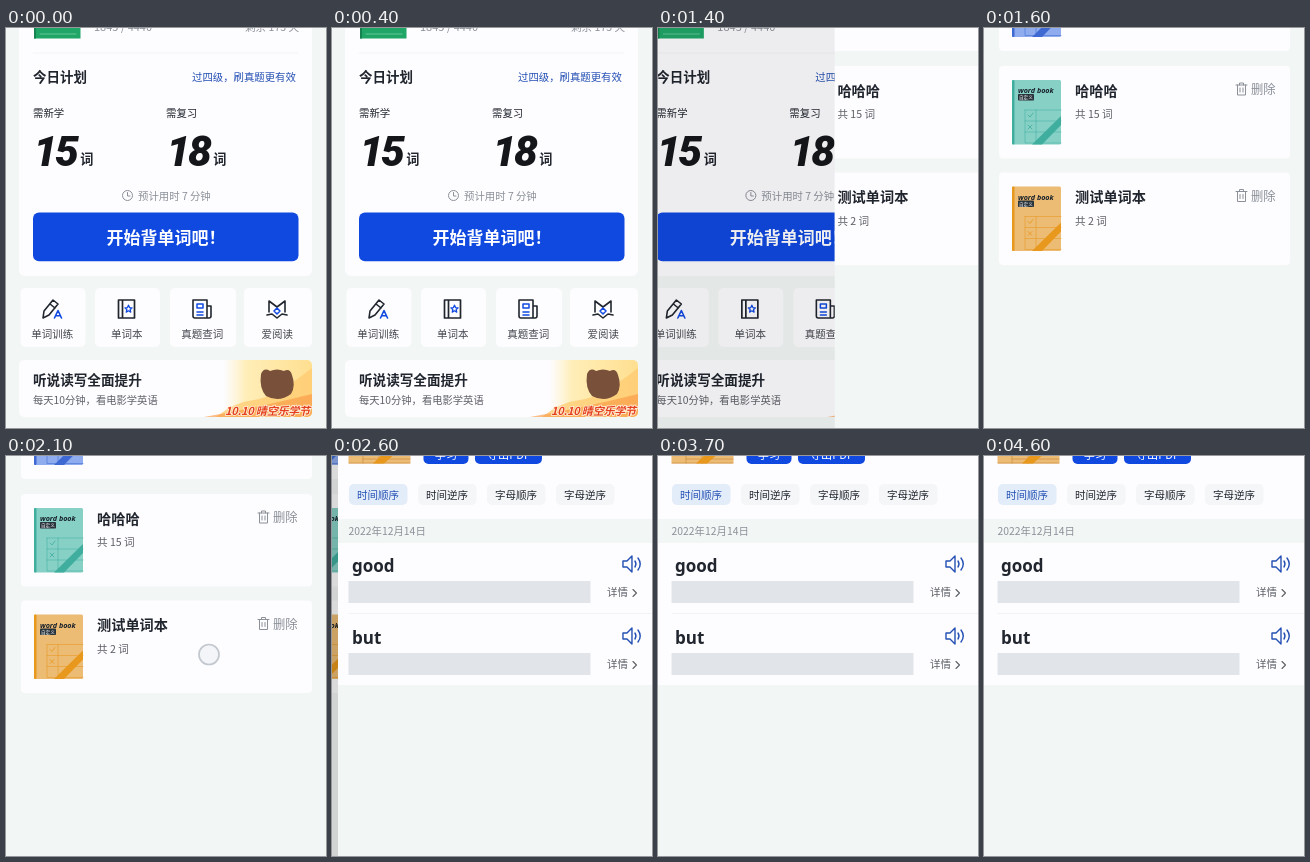
An HTML page that plays this animation: 320 px wide and 400 px high, repeating every 4700 ms.

```html
<!DOCTYPE html>
<html lang="zh-CN">
<head>
<meta charset="utf-8">
<title>单词本</title>
<style>
  html, body { margin: 0; width: 100%; height: 100%; overflow: hidden; background: #f2f6f4; }
  svg { display: block; width: 320px; height: 400px; }
  text { font-family: "Noto Sans CJK SC", "Noto Sans CJK", "Noto Sans", sans-serif; white-space: pre; }
</style>
</head>
<body>
<svg id="stage" viewBox="0 0 320 400" xmlns="http://www.w3.org/2000/svg"></svg>
<script>
const LOOP = 4700, WIDTH = 320, PARALLAX = 64, PUSH_MS = 250;
const LIST_PUSH = 1334, DETAIL_PUSH = 2395;
const BG = '#f2f6f4', PAPER = '#fdfcfe', INK = '#20252e', GREY = '#8b9099', MID = '#5c6066';
const BLUE = '#1049e0', LINK = '#2450b4';

const rect = (x, y, w, h, fill, r = 0, extra = '') =>
  `<rect x="${x}" y="${y}" width="${w}" height="${h}" rx="${r}" fill="${fill}" ${extra}/>`;
const text = (x, y, size, str, fill = INK, extra = '') =>
  `<text x="${x}" y="${y}" font-size="${size}" fill="${fill}" ${extra}>${str}</text>`;
const bold = (x, y, size, str, fill = INK, extra = '') =>
  text(x, y, size, str, fill, 'font-weight="700" ' + extra);
const line = (d, stroke, w = 1.4, extra = '') =>
  `<path d="${d}" fill="none" stroke="${stroke}" stroke-width="${w}" stroke-linecap="round" stroke-linejoin="round" ${extra}/>`;
const at = (x, y, body) => `<g transform="translate(${x} ${y})">${body}</g>`;
const page = body => rect(0, 0, WIDTH, 400, BG) + body;

const star = (r, inner) => 'M' + Array.from({ length: 10 }, (_, i) => {
  const a = i * Math.PI / 5 - Math.PI / 2, d = i % 2 ? inner : r;
  return (d * Math.cos(a)).toFixed(2) + ' ' + (d * Math.sin(a)).toFixed(2);
}).join('L') + 'Z';

// Tile icons, each centred on its own origin
const icons = {
  pencil: line('M-9 9L-8 2L1-9L6-5L-3 6ZM-2-5L3-1', INK, 1.6) +
    line('M2.5 9L6 1.5L9.5 9M3.8 6.8H8.2', BLUE, 1.6),
  notebook: line('M-8-9H8V9H-8ZM-4-9V9', INK, 1.7) + at(2, 0, line(star(3.8, 1.8), BLUE, 1.3)),
  news: line('M-9-9H5V9H-7Q-9 9-9 7ZM5-3H9V7Q9 9 7 9H4', INK, 1.6) +
    line('M-5-5H1V-1H-5ZM-5 3H1M-5 6H1', BLUE, 1.5),
  reader: line('M-8 3V-8L0-2L8-8V3M-10 6L-5 5L0 9L5 5L10 6', INK, 1.6) +
    line('M0-1L3 2L0 5L-3 2Z', BLUE, 1.5)
};

const tile = (x, w, icon, label) =>
  rect(x, 260, w, 59, PAPER, 5) + at(x + w / 2 - 1, 281, icons[icon]) +
  text(x + w / 2 - .7, 310, 10.5, label, '#43474e', 'text-anchor="middle"');

const count = (x, label, n) =>
  text(x, 89, 10.4, label) +
  text(x + .5, 137.5, 42.5, n, '#14161a', 'style="font-family:Roboto,Inter,sans-serif" font-weight="800" font-style="italic" letter-spacing="-2.4"') +
  bold(x + 47.3, 135.7, 13.2, '词');

const banner = () =>
  rect(13, 332, 293, 57, PAPER, 5) +
  `<g clip-path="url(#bannerClip)">` +
  rect(218, 332, 88, 57, 'url(#sun)') +
  `<path d="M210 389Q228 374 248 372T306 340V389Z" fill="#ffcb70" opacity=".75"/>` +
  `<path d="M198 389Q250 380 306 366V389Z" fill="#fb9a45" opacity=".65"/>` +
  `<path d="M255 346Q258 339 264 343Q271 340 278 343Q284 340 286 347Q290 358 285 366Q273 375 260 368Q253 360 255 346Z" fill="#79513a"/>` +
  `</g>` +
  bold(219, 386.5, 11, '10.10 晴空乐学节', '#e4401f',
    'font-style="italic" stroke="#fff3dc" stroke-width="1.6" paint-order="stroke" letter-spacing="-.2"') +
  bold(27, 357, 13.6, '听说读写全面提升') +
  text(27, 376, 10.3, '每天10分钟，看电影学英语', MID);

const home = () => page(
  rect(13, -20, 293, 268, PAPER, 6) +
  rect(28, -40, 46.5, 50.5, '#1fa566') + rect(28, -40, 2, 50.5, '#158350') +
  line('M34 6H70', '#63c796', 1) + line('M27 25H292', '#f4f4f7', 1) +
  text(88, 3, 11, '1845 / 4440', GREY) + text(239, 3, 10.6, '剩余 173 天', GREY) +
  bold(27, 53.5, 13.5, '今日计划') +
  text(186, 52.5, 10.4, '过四级，刷真题更有效', LINK) +
  count(27, '需新学', 15) + count(160, '需复习', 18) +
  `<circle cx="121.5" cy="167.5" r="5" fill="none" stroke="${GREY}"/>` +
  line('M121.5 164.5V168H124', GREY, 1) +
  text(132, 171.5, 10.4, '预计用时 7 分钟', GREY) +
  rect(27, 184.5, 265.5, 48.7, BLUE, 6) +
  bold(100.4, 216, 17, '开始背单词吧！', '#fff') +
  tile(14.5, 65, 'pencil', '单词训练') + tile(89, 65, 'notebook', '单词本') +
  tile(164, 66, 'news', '真题查词') + tile(238, 68, 'reader', '爱阅读') +
  banner());

const book = (x, y, cover, accent) => at(x, y,
  rect(0, 0, 49, 64.5, cover, 1.5) + rect(0, 0, 2.5, 64.5, accent, 1) +
  line('M13 30H49M13 41H49M13 52H49M13 30V63H49M24 30V63', accent, .7, 'opacity=".75"') +
  line('M16 35L18 37L21 33M16 45L20 49M20 45L16 49', accent, .8) +
  `<path d="M20 64.5L49 36V45L30 64.5Z" fill="${accent}"/>` +
  bold(6, 13, 7.2, 'word book', '#17202a', 'font-style="italic" style="font-family:\'Noto Sans\',sans-serif"') +
  rect(6, 14, 16, 6.5, '#27323a', .8) + text(7, 19.3, 4.6, '自定义', '#fff'));

const trash = line('M0 2H11M3.5 2V0H7.5V2M1.5 2V12H9.5V2M4 5V9M7 5V9', GREY, 1);

const deck = (y, name, total, cover, accent) =>
  rect(15, y, 291, 92.5, PAPER, 4) + book(28, y + 14, cover, accent) +
  bold(91, y + 29.5, 14.2, name) + text(91, y + 52, 10.6, `共 ${total} 词`, MID) +
  at(252, y + 17, trash) + text(267, y + 28, 12.3, '删除', GREY);

const list = () => page(
  deck(-69.5, '单词本', 8, '#8eacee', '#3f69d2') +
  deck(38, '哈哈哈', 15, '#86d0c6', '#3fae9e') +
  deck(144.5, '测试单词本', 2, '#ecbb74', '#e8981c') +
  `<circle id="touch" cx="203" cy="198.5" r="10" fill="#f3f5f8" stroke="#c3c8cf" stroke-width="1.7"/>`);

const chip = (x, label, active) =>
  rect(x, 28, 58.5, 21, active ? '#e3edf9' : '#f4f6f7', 5) +
  text(x + 29, 42.8, 10.5, label, active ? LINK : INK, 'text-anchor="middle"');

const speaker = line('M0 5H4L9 0V16L4 11H0ZM12 5Q14 8 12 11M15 2Q19.5 8 15 14', LINK, 1.4);

const word = (y, str) =>
  bold(17, y + 29, 17, str, INK, 'style="font-family:\'Noto Sans\',\'Open Sans\',sans-serif"') +
  at(288, y + 13, speaker) + rect(13.5, y + 38, 242, 22, '#e1e5ea') +
  text(272, y + 53.3, 10.5, '详情', MID) + line(`M298 ${y + 46.5}L301.5 ${y + 50}L298 ${y + 53.5}`, MID, 1.1);

const detail = () => page(
  rect(0, 0, WIDTH, 63, PAPER) + rect(0, 87, WIDTH, 142, PAPER) +
  rect(13.5, -40, 62, 47.5, '#ecbb74', 1) +
  line('M14 7H75M28 3H75M28-2V7M44-2V7', '#cf944b', .8) +
  `<path d="M38 7.5L50-4H62L49 7.5Z" fill="#e8981c"/>` +
  rect(88.5, -20, 45, 28, BLUE, 5) + rect(140, -20, 67, 28, BLUE, 5) +
  text(111, 2.6, 11.2, '学习', '#fff', 'text-anchor="middle" font-weight="500"') +
  text(173.5, 2.6, 11.2, '导出PDF', '#fff', 'text-anchor="middle" font-weight="500"') +
  chip(14, '时间顺序', true) + chip(83, '时间逆序') + chip(152, '字母顺序') + chip(221, '字母逆序') +
  text(13.5, 79, 10.4, '2022年12月14日', GREY) +
  word(87, 'good') + line('M14 157.5H320', '#f1f2f5', 1) + word(159, 'but'));

const layer = (name, body) =>
  `<g id="${name}" clip-path="url(#${name}Clip)"><g id="${name}Body">${body}</g></g>`;
const clip = name => `<clipPath id="${name}Clip"><rect id="${name}Edge" width="${WIDTH}" height="400"/></clipPath>`;
const shade = name => rect(0, 0, WIDTH, 400, '#000', 0, `id="${name}Shade"`);

document.getElementById('stage').innerHTML =
  `<defs>${clip('home')}${clip('list')}${clip('detail')}
    <clipPath id="bannerClip"><rect x="13" y="332" width="293" height="57" rx="5"/></clipPath>
    <linearGradient id="sun"><stop stop-color="#fff0c4" stop-opacity="0"/>
      <stop offset=".25" stop-color="#ffeeb8"/><stop offset="1" stop-color="#ffdf90"/></linearGradient></defs>` +
  layer('home', home()) + shade('home') + layer('list', list()) + shade('list') + layer('detail', detail());

const el = id => document.getElementById(id);
const set = (id, attr, value) => el(id).setAttribute(attr, value);
const clamp = v => Math.min(1, Math.max(0, v));

// CSS "ease": cubic-bezier(.25, .1, .25, 1)
function ease(x) {
  if (x <= 0 || x >= 1) return clamp(x);
  const curve = (s, a, b) => 3 * s * (1 - s) ** 2 * a + 3 * s * s * (1 - s) * b + s ** 3;
  let lo = 0, hi = 1;
  for (let i = 0; i < 24; i++) {
    const mid = (lo + hi) / 2;
    if (curve(mid, .25, .25) < x) lo = mid; else hi = mid;
  }
  return curve(lo, .1, 1);
}

// The entering page is uncovered from the right while its content travels half as far.
function placePage(name, entered, covered) {
  const edge = WIDTH * (1 - entered);
  set(name + 'Edge', 'x', edge);
  set(name + 'Body', 'transform', `translate(${edge / 2 - PARALLAX * covered} 0)`);
  set(name, 'visibility', entered > 0 && covered < 1 ? 'visible' : 'hidden');
  if (el(name + 'Shade')) set(name + 'Shade', 'opacity', covered < 1 ? .14 * covered : 0);
}

function draw(t) {
  const toList = ease((t - LIST_PUSH) / PUSH_MS);
  const toDetail = ease((t - DETAIL_PUSH) / PUSH_MS);
  placePage('home', 1, toList);
  placePage('list', toList, toDetail);
  placePage('detail', toDetail, 0);
  set('touch', 'opacity', clamp((t - 2040) / 40) * clamp((2380 - t) / 60));
}

const start = performance.now();
function tick() {
  draw((performance.now() - start) % LOOP);
  requestAnimationFrame(tick);
}
tick();
</script>
</body>
</html>
```
